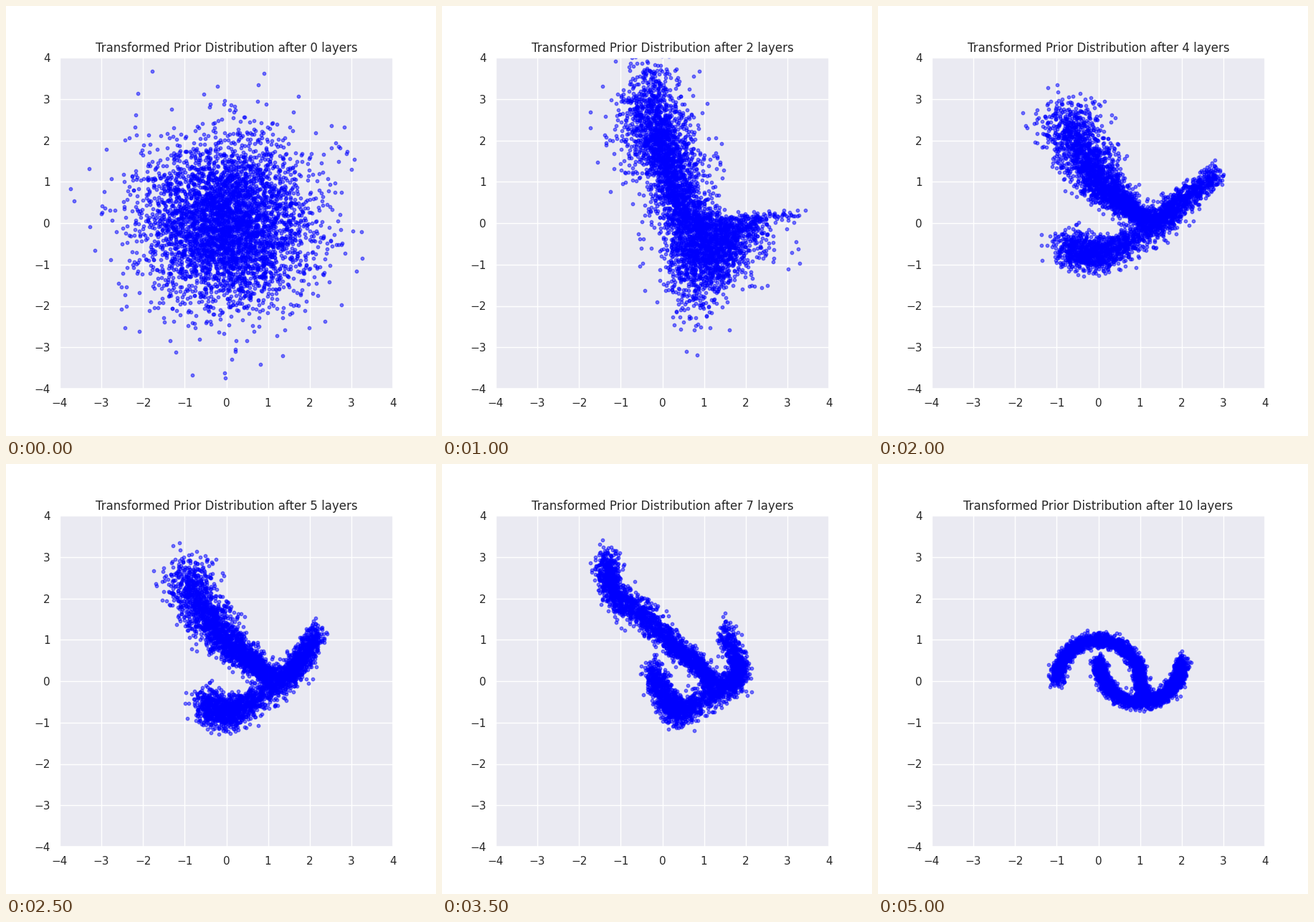
A matplotlib script that plays this animation: 600 by 600 pixels, repeating every 5500 ms.

```python
import numpy as np
import matplotlib.pyplot as plt
from matplotlib.animation import FuncAnimation

plt.rcParams.update({
    "font.family": "DejaVu Sans", "text.color": ".15",
    "axes.facecolor": "#EAEAF2", "axes.edgecolor": "white",
    "axes.linewidth": 1.25, "axes.grid": True, "axes.axisbelow": True,
    "grid.color": "white", "grid.linewidth": 1, "grid.linestyle": "-",
    "axes.titlesize": 12, "xtick.labelsize": 11, "ytick.labelsize": 11,
    "xtick.color": ".15", "ytick.color": ".15",
    "xtick.major.size": 6, "ytick.major.size": 6,
    "xtick.bottom": False, "ytick.left": False,
})
HALF = 2200
rng = np.random.default_rng(3)


def step(v, centre, slope):
    """Smooth fall from 1 to 0 around the centre."""
    return 1 / (1 + np.exp(slope * (v - centre)))


def bump(v, centre, width):
    return np.exp(-((v - centre) / width) ** 2)


def spline(s, pts):
    """Smooth path through evenly timed points, s from 0 to 1."""
    pts = np.array(pts, float)
    m = np.gradient(pts, axis=0)
    s = s * (len(pts) - 1)
    i = np.clip(s.astype(int), 0, len(pts) - 2)
    u = (s - i)[:, None]
    return ((1 + 2 * u) * (1 - u) ** 2 * pts[i] + u * (1 - u) ** 2 * m[i]
            + u * u * (3 - 2 * u) * pts[i + 1] + u * u * (u - 1) * m[i + 1])


# Each sample keeps its place along an arm and its random offset from it.
along = [rng.random(HALF) * .95, rng.random(HALF)]
offset = rng.normal(size=(2, HALF, 2))


def arms(upper, lower, upper_width, lower_width, tall=1):
    """Two fuzzy arms; widths run linearly from first to last point."""
    parts = []
    for s, noise, pts, (w0, w1) in zip(along, offset, (upper, lower),
                                       (upper_width, lower_width)):
        spread = (w0 + (w1 - w0) * s)[:, None] * (1, tall)
        parts.append(spline(s, pts) + noise * spread)
    return np.vstack(parts)


def mix(px, py):
    """Every layer moves one axis only: x of one state, y of the other."""
    return np.column_stack([px[:, 0], py[:, 1]])


def layer1(p):
    x, y = p.T
    low = step(y, 0, 6)
    scale = .36 + .16 * np.exp(-.4 * y) + .28 * bump(y, -.35, .4)
    shift = low * (1.05 + .2 * (y + 1) ** 2) + (1 - low) * .04 * y ** 2
    return np.column_stack([x * scale + shift, y])


def layer2(p):
    x, y = p.T
    scale = .4 + .9 * step(x, 1.3, 1.8)
    shift = 1.6 * step(x, .1, 7) + .4 * step(x, 2, -3)
    return np.column_stack([x, y * scale + shift])


def layer8(p):
    x, y = p.T
    scale = .42 + .7 * step(x, .2, -3.5)
    shift = -.2 - .45 * step(x, 1.1, -4) + .43 * bump(x, 0, .55)
    return np.column_stack([x, y * scale + shift])


def moons():
    t = np.linspace(np.pi, 0, 9)
    upper = np.vstack([np.column_stack([np.cos(t), np.sin(t)]),
                       [(1.06, -.25), (1.1, -.5)]])
    t = np.linspace(0, np.pi, 11)
    lower = np.column_stack([1 - np.cos(t), .5 - np.sin(t)])
    return arms(upper, lower, (.085, .075), (.085, .085))


def flow():
    p0 = rng.normal(size=(2 * HALF, 2))
    p1 = layer1(p0)
    p2 = layer2(p1)
    p3 = arms([(-.75, 3.6), (-.45, 2.3), (-.1, 1.35), (.25, .7), (.7, .3), (1.3, 0)],
              [(-.65, -1.4), (-.25, -1.1), (.4, -.65), (1.3, -.1), (1.9, -.02), (2.8, .08)],
              (.42, .08), (.32, .13))
    p5 = arms([(-.95, 2.6), (-.65, 1.8), (-.2, 1.25), (.25, .75), (.7, .4), (1.2, 0)],
              [(-.5, -.5), (-.1, -.8), (.4, -.6), (1.2, -.05), (1.75, .45), (2.15, 1.2)],
              (.32, .08), (.22, .12))
    p7 = arms([(-1.35, 2.9), (-1.15, 2.1), (-.4, 1.55), (.35, .8), (.9, .35), (1.25, -.15)],
              [(-.25, .25), (.12, -.5), (.5, -.7), (1.3, -.2), (1.85, .2), (1.5, 1.2)],
              (.15, .06), (.13, .11), tall=1.5)
    p8, p10 = layer8(p7), moons()
    return [p0, p1, p2, p3, mix(p3, p5), p5, mix(p5, p7), p7, p8, mix(p10, p8), p10]


states = flow()
fig, ax = plt.subplots(figsize=(6, 6), dpi=100)
dots = ax.scatter(*states[0].T, s=10, c="blue", alpha=.5)
ax.set(xlim=(-4, 4), ylim=(-4, 4), xticks=range(-4, 5), yticks=range(-4, 5))
title = ax.set_title("")


def draw(i):
    dots.set_offsets(states[i])
    title.set_text(f"Transformed Prior Distribution after {i} layers")
    return dots, title


anim = FuncAnimation(fig, draw, frames=len(states), interval=500, repeat=True)
plt.show()
```
